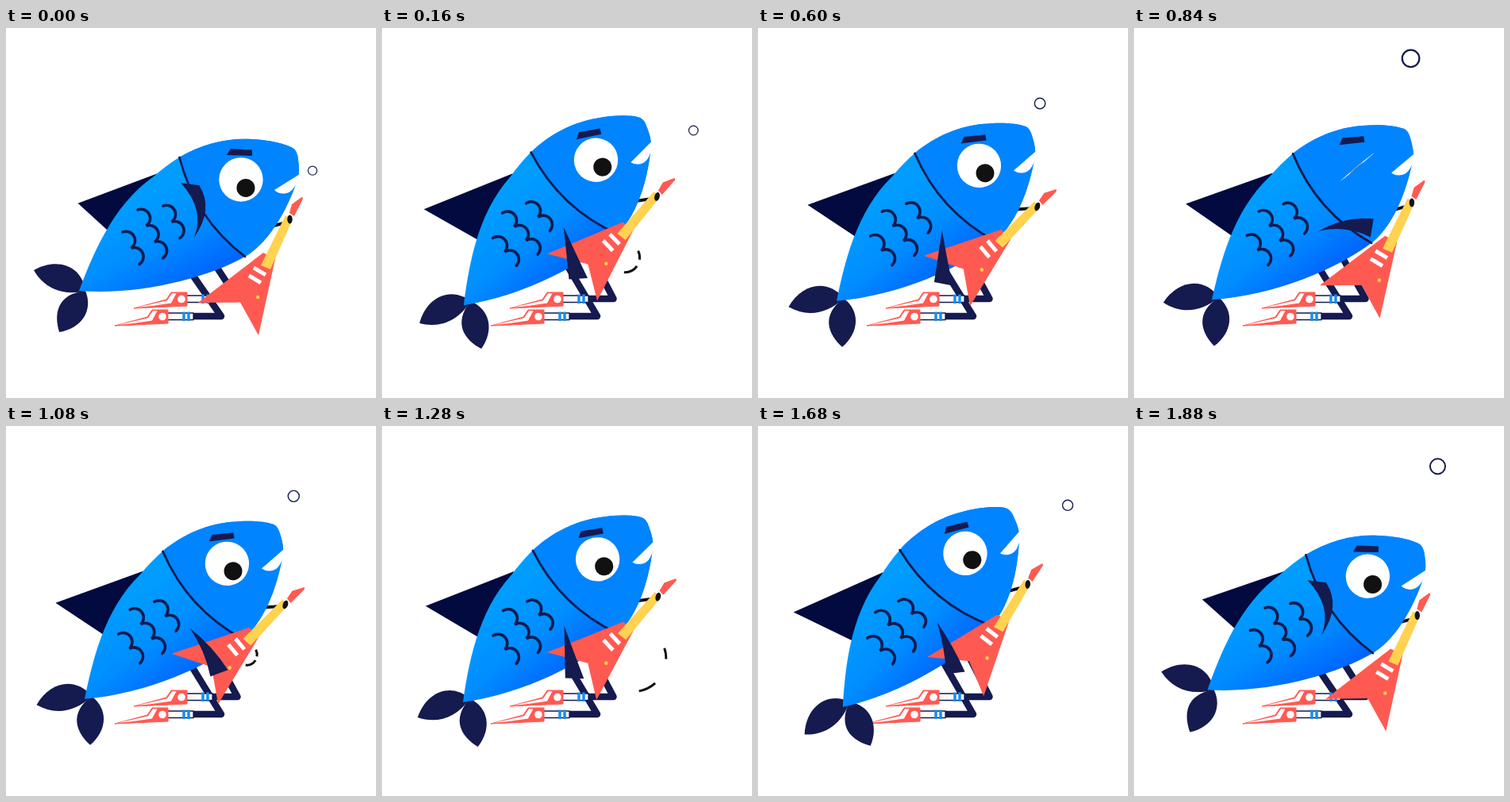
An HTML page that plays this animation: 466x466 px, repeating every 1920 ms.

```html
<!DOCTYPE html>
<html>
<head>
<meta charset="utf-8">
<title>Rocking fish</title>
<style>
html, body { margin: 0; width: 100%; height: 100%; overflow: hidden; background: #fff }
svg { display: block; width: 100vw; height: 100vh }
</style>
</head>
<body>
<svg viewBox="0 0 466 466">
  <defs>
    <linearGradient id="skin" gradientUnits="userSpaceOnUse" x1="165" y1="215" x2="225" y2="330">
      <stop offset="0" stop-color="#009dff"/>
      <stop offset=".5" stop-color="#008dff"/>
      <stop offset="1" stop-color="#0062ff"/>
    </linearGradient>
    <g id="shoe">
      <path d="M204 359H236V367.500H204" fill="#fff" stroke="#151a4f" stroke-width="1.300"/>
      <path d="M224 357.500V369M230 357.500V369" stroke="#1a8cf0" stroke-width="3.500"/>
      <path d="M137 375L178 364L184 355H204V372Z" fill="#ff5a52" stroke="#ff5a52"/>
      <path d="M141 374L179 365.300L185 356.300H190.500L184 368.500L160 372Z" fill="#fff"/>
      <circle cx="197" cy="363.500" r="4.800" fill="#fff"/>
    </g>
  </defs>

  <g class="body"><path id="fin" fill="#030a3f"/></g>

  <g fill="none" stroke="#151a4f" stroke-width="8.500" stroke-linejoin="round">
    <path id="farLeg"/>
    <path id="nearLeg"/>
  </g>
  <use href="#shoe" x="24" y="-22"/>
  <use href="#shoe"/>

  <g class="body">
    <g id="tail" fill="#151a4f">
      <path d="M100 331C96 300 65 288 35 305C48 328 72 338 100 331Z"/>
      <path d="M100 331C110 355 96 378 67 383C60 360 64 335 100 331Z"/>
    </g>
    <path id="reach" fill="none" stroke="#111" stroke-width="4"/>
    <path id="trunk" fill="url(#skin)"/>
    <path id="head" fill="#0084ff"/>
    <g fill="none" stroke="#151a4f" stroke-linecap="round">
      <path d="M218.500 163Q238 240 301 288" stroke-width="2.800"/>
      <path id="scales" stroke-width="3.600"/>
    </g>
    <path d="M338 204L370 184L369 190Q361 208 351 208.500Q343 209 338 204Z" fill="#fff"/>
    <g id="eye">
      <circle cx="296" cy="191" r="27.700" fill="#fff"/>
      <circle cx="302" cy="201.500" r="11.500" fill="#111"/>
    </g>
    <path d="M283 152L310 153.500V161L278 160Z" fill="#151a4f"/>
  </g>

  <path id="twang" fill="none" stroke="#111" stroke-width="3"/>

  <g class="body">
    <g id="guitar">
      <path d="M242 346L324 283L339 291L318 387L295 345.500Z" fill="#ff5a52"/>
      <path d="M312 302L327 311M306 312L321 321" stroke="#fff" stroke-width="5"/>
      <circle cx="317" cy="339" r="2.300" fill="#ffd250"/>
      <path d="M321 299L333 304L361 241L352 236Z" fill="#ffd250"/>
      <path d="M357 233L360 222L373 212.500L374 215L363 237Z" fill="#ff5a52"/>
      <ellipse cx="357.500" cy="241" rx="3.200" ry="5.500" fill="#111"/>
    </g>
    <path id="arm" fill="#151a4f"/>
  </g>
  <g id="bubbles" fill="none" stroke="#151a4f"></g>
</svg>
<script>
const LOOP = 1920, BEAT = 960, BOB = 480;
const $ = id => document.getElementById(id);
const set = (id, name, value) => $(id).setAttribute(name, value);
const clamp = x => Math.min(1, Math.max(0, x));
const ramp = (t, a, b) => clamp((t - a) / (b - a));
const smooth = x => x * x * (3 - 2 * x);
const mix = (a, b, u) => a + (b - a) * u;
const rad = deg => deg * Math.PI / 180;

// start time, end time, x from, x to, sideways bulge, y from, y to
const bubbles = [
  [0, 410, 386, 368, 14, 180, 50],
  [330, 855, 374.5, 348.5, -6, 159, 35],
  [860, 1225, 375, 354, 0, 158, 43],
  [1390, 1905, 386, 381, 7, 171, 45]
];

const face = 'C248 145 280 138 310 140C332 141 352 146 361 151Q367 154 368 166Q370 180 368 188C358 220 335 268 301 288';
set('trunk', 'd', `M92 331C108 289 133 224 186 187Q202 173 218 163${face}C255 314 170 337 92 331Z`);
set('head', 'd', `M218 163${face}Q238 240 218 163Z`);
set('scales', 'd', [[147, 257, 2], [166, 229, 3], [198, 224, 2]]
  .map(([x, y, n]) => `M${x} ${y}` + 'a11.5 11.5 0 0 1 10.5 20.300'.repeat(n)).join(''));

// Where a point of the body lands once the body has turned
function turned(x, y, deg) {
  const c = Math.cos(rad(deg)), s = Math.sin(rad(deg)), dx = x - 176, dy = y - 293;
  return [176 + dx * c - dy * s, 293 + dx * s + dy * c];
}

function arc(cx, cy, r, mid, half) {
  const at = a => [cx + r * Math.cos(rad(a)), cy + r * Math.sin(rad(a))];
  return `M${at(mid - half)}A${r} ${r} 0 0 1 ${at(mid + half)}`;
}

function drawFish(t) {
  const lift = 1 - Math.cos(2 * Math.PI * (t + 4) / BOB);
  const lean = -8.5 * lift;
  document.querySelectorAll('.body').forEach(g => g.setAttribute('transform', `rotate(${lean} 176 293)`));
  set('tail', 'transform', `translate(${lift} ${-2 * lift}) rotate(${-20.5 * lift} 100 331)`);
  const out = 15.5 * lift ** .6;
  set('fin', 'd', `M${91 - out} ${221 - out * .95}L190 183.500L150 275Z`);
  set('nearLeg', 'd', `M236 363H271L${turned(226, 298, lean)}`);
  set('farLeg', 'd', `M259 341H291.500L${turned(258, 290, lean)}`);
}

function drawPlaying(t) {
  const play = t < 400 ? smooth(ramp(t, 15, 115)) : 1 - smooth(ramp(t, 640, 954));
  set('guitar', 'transform', `translate(${2 * play} ${12 * play}) rotate(${28 * play} 357 243)`);
  set('reach', 'd', `M325 252L${357 + 2 * play} ${244 + 11 * play}`);

  const raise = t < 400 ? 1 - smooth(ramp(t, 30, 145)) : ramp(t, 660, 920) ** 2;
  const bend = 11 * raise - 45 * raise * (1 - raise);
  const rest = mix(84, 98, ramp(t, 0, 600));
  set('arm', 'd', `M0 0Q34 ${2 * bend - 5.5} 70 -12L65 11Q34 ${2 * bend + 5.5} 0 0Z`);
  set('arm', 'transform', `translate(237 264) rotate(${mix(rest, -94, raise)})`);

  const open = Math.max(.02, smooth(clamp(Math.abs(t - 840) / 70)));
  set('eye', 'transform', `translate(296 191) rotate(-32) scale(1 ${open}) rotate(32) translate(-296 -191)`);

  const age = t - 120, half = 32 - .08 * age, u = age / 240;
  const seen = age > -30 && age < 300;
  const ring = [mix(303, 319, u), mix(288, 294, u), mix(13, 47, u)];
  set('twang', 'd', seen ? arc(...ring, -9, half * .6) + arc(...ring, 64, half) : '');
}

function drawBubbles(t) {
  $('bubbles').innerHTML = bubbles.map(([t0, t1, x0, x1, bulge, y0, y1]) => {
    const u = (t - t0) / (t1 - t0);
    if (u < 0 || u > 1) return '';
    const x = mix(x0, x1, u) + 4 * bulge * u * (1 - u), y = mix(y0, y1, u);
    const r = 5.6 + 5 * Math.max(0, (180 - y) / 140) ** 3;
    return `<circle cx="${x}" cy="${y}" r="${r}" stroke-width="${r * .21}"/>`;
  }).join('');
}

function frame() {
  const t = performance.now() % LOOP;
  drawFish(t);
  drawPlaying(t % BEAT);
  drawBubbles(t);
  requestAnimationFrame(frame);
}
frame();
</script>
</body>
</html>
```
